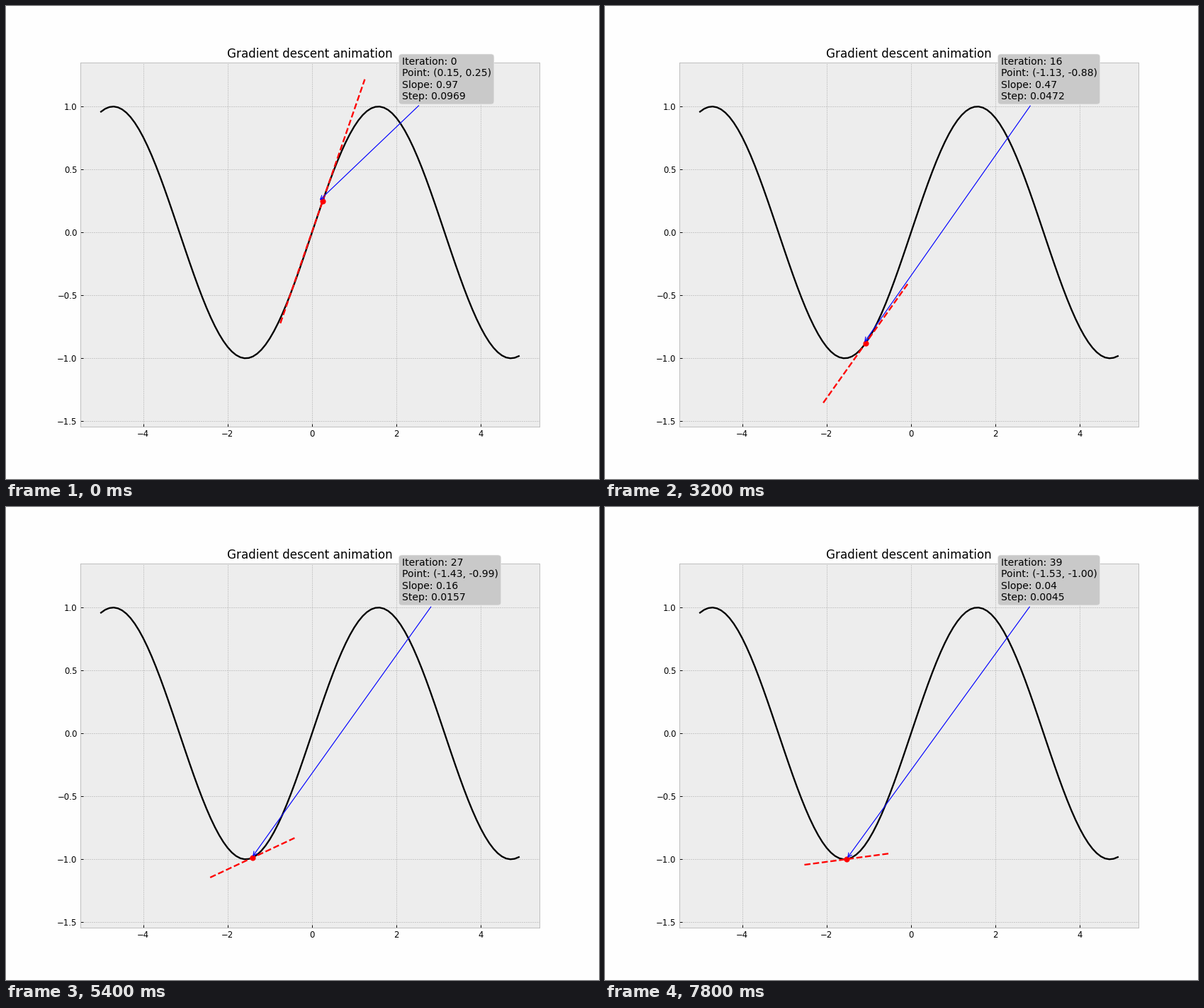
Animation, 837 px wide and 669 px high, one loop 8 s. Source, as a matplotlib script:

```python
import numpy as np
import matplotlib.pyplot as plt
from matplotlib.animation import FuncAnimation

WIDTH, HEIGHT, DPI = 837, 669, 83.7
FRAMES, INTERVAL = 40, 200
START, RATE = 0.25, 0.1

plt.rcParams.update({
    "font.family": "DejaVu Sans",
    "font.size": 10,
    "figure.facecolor": "#fefefe",
    "axes.facecolor": "#ededed",
    "axes.edgecolor": "#bcbcbc",
    "axes.grid": True,
    "axes.titlesize": "x-large",
    "grid.color": "#b2b2b2",
    "grid.linestyle": "--",
    "grid.linewidth": 0.5,
    "lines.linewidth": 2,
    "xtick.direction": "in",
    "ytick.direction": "in",
})


def descend(x, steps):
    """Positions visited while walking down sin(x)."""
    path = [x]
    for _ in range(steps):
        x -= RATE * np.cos(x)
        path.append(x)
    return np.array(path)


path = descend(START, FRAMES)
points = path[:-1]
heights, slopes = np.sin(points), np.cos(points)

# The tiny surplus keeps the canvas from being truncated by a pixel.
fig, ax = plt.subplots(figsize=((WIDTH + 0.01) / DPI, (HEIGHT + 0.01) / DPI),
                       dpi=DPI)
fig.subplots_adjust(left=0.125, right=0.9, bottom=0.11, top=0.88)

xs = np.arange(-5, 5, 0.1)
ax.plot(xs, np.sin(xs), color="black")
tangent, = ax.plot([], [], "--", color="red")
dot, = ax.plot([], [], "o", color="red")
ax.set_title("Gradient descent animation")

# Limits hold the curve and every tangent, with a 5% margin.
low, high = (heights - slopes).min(), (heights + slopes).max()
pad_x, pad_y = 0.05 * (xs[-1] - xs[0]), 0.05 * (high - low)
ax.set_xlim(xs[0] - pad_x, xs[-1] + pad_x)
ax.set_ylim(low - pad_y, high + pad_y)

note = ax.annotate(
    "", xy=(0, 0), xytext=(0.7, 0.9), textcoords="axes fraction", size=12,
    bbox=dict(boxstyle="round", fc="#c9c9c9", ec="#eeeeee", lw=0.5),
    arrowprops=dict(arrowstyle="->", color="blue", lw=1),
)


def update(i):
    x, y, slope, after = points[i], heights[i], slopes[i], path[i + 1]
    tangent.set_data([x - 1, x + 1], [y - slope, y + slope])
    dot.set_data([x], [y])
    note.xy = (after, y)
    note.set_text(f"Iteration: {i}\n"
                  f"Point: ({after:.2f}, {y:.2f})\n"
                  f"Slope: {slope:.2f}\n"
                  f"Step: {RATE * slope:.4f}")
    return tangent, dot, note


anim = FuncAnimation(fig, update, frames=FRAMES, interval=INTERVAL,
                     repeat=True, repeat_delay=0)
plt.show()
```
